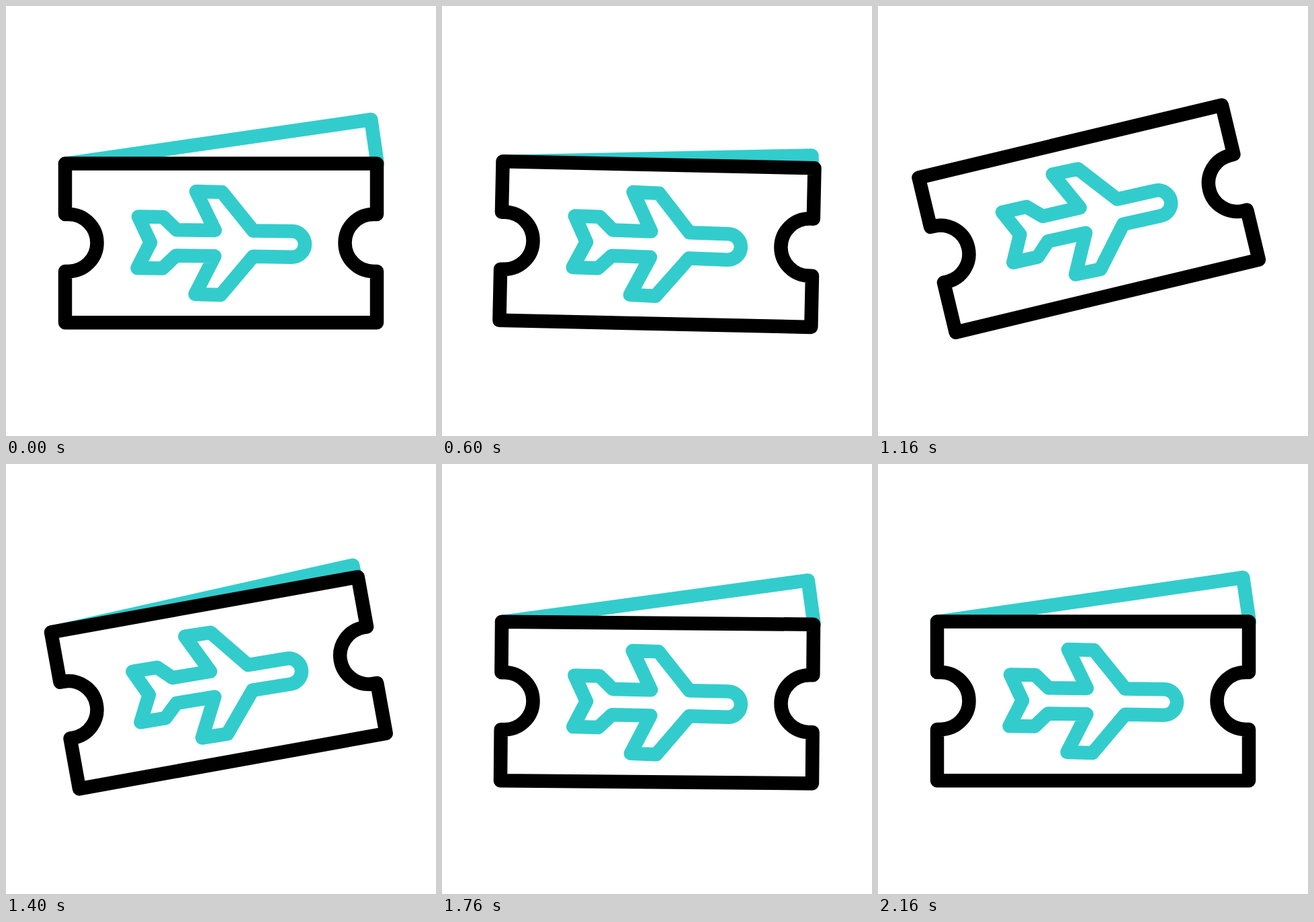
An HTML page that plays this animation: 640x640 px, repeating every 2.56 s.

```html
<!DOCTYPE html>
<html lang="en">
<head>
<meta charset="utf-8">
<title>Plane ticket</title>
<style>
  html, body { margin: 0; width: 100%; height: 100%; overflow: hidden; background: #fff; }
  svg { display: block; width: 100vw; height: 100vh; }
  path { fill: none; stroke: #3cc; stroke-width: 20.5; stroke-linecap: round; stroke-linejoin: round; }
  #fill { fill: #fff; stroke: none; }
  #edge { stroke: #000; }
</style>
</head>
<body>
<svg viewBox="0 0 640 640">
  <clipPath id="inside"><use href="#fill"/></clipPath>
  <g id="ticket">
    <path id="back" d="M88 235H548V301"/>
    <path id="fill"/>
    <path d="M197 313.5L234 314 254 333.3 311 334 283 276 321.5 277 368 334.5 426 335.3A19.2 19.2 0 0 1 425.5 373.7L368 372.7 319.5 430 281.5 429 310.5 372.3 253 371.5 233 390.5 195.5 390 215 352Z"/>
    <g clip-path="url(#inside)"><path id="shine" d="M0 0L-600 600"/></g>
    <path id="edge"/>
  </g>
</svg>
<script>
const LOOP = 2560, STEP = 40;
const $ = id => document.getElementById(id);
const outline = 'M88 234.5H552V310H547A42.5 42.5 0 0 0 547 395H552V471.2H88V395H93A42.5 42.5 0 0 0 93 310H88Z';
$('fill').setAttribute('d', outline);
$('edge').setAttribute('d', outline);

// Eased progress from 0 to 1 between two times
function ease(t, from, to) {
  const u = Math.min(1, Math.max(0, (t - from) / (to - from)));
  return u * u * (3 - 2 * u);
}
const mix = (a, b, u) => a + (b - a) * u;

function draw(t) {
  const set = (id, value) => $(id).setAttribute('transform', value);
  // The ticket dips, swings up, falls a little past level and settles
  const swing = ease(t, 905, 1252), fall = ease(t, 1280, 1560), settle = ease(t, 1720, 1840);
  const pose = (dip, high, low) => mix(mix(mix(dip, high, swing), low, fall), 0, settle);
  const tilt = pose(4.8 * ease(t, 490, 820), -17.3, .68);
  const lift = pose(-7 * ease(t, 400, 820), 21.5, .3);
  const spread = -8.25 * (1 - ease(t, 120, 864) + ease(t, 1280, 1620));

  set('ticket', `translate(0 ${lift}) rotate(${tilt} 93 353)`);
  set('back', `rotate(${spread} 88 235)`);
  $('shine').style.display = t >= 1800 && t < 2160 ? '' : 'none';
  set('shine', `translate(${655 - (t - 1920) * 2.25} 150)`);
}

const start = performance.now();
function tick() {
  const t = (performance.now() - start) % LOOP;
  draw(Math.floor(t / STEP) * STEP);
  requestAnimationFrame(tick);
}
tick();
</script>
</body>
</html>
```
